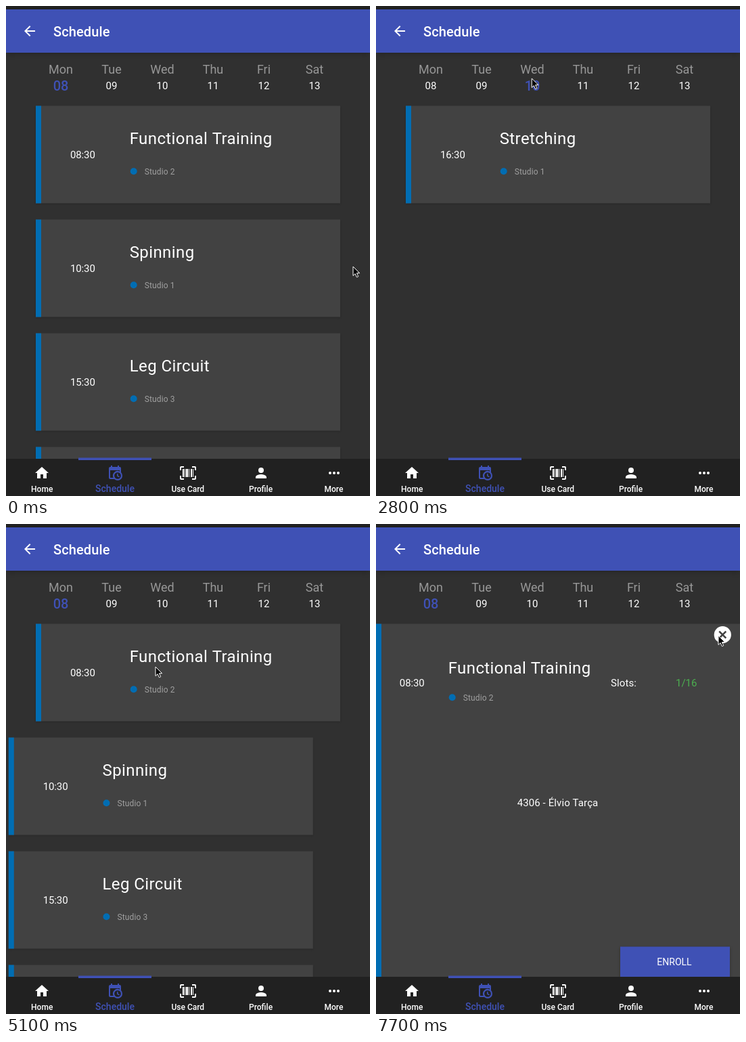
An HTML page with a canvas that plays this animation: 538x724 px, repeating every 8 s.

```html
<!DOCTYPE html>
<html lang="en">
<head>
<meta charset="utf-8">
<title>Class schedule</title>
<style>
  html, body { margin: 0; width: 100%; height: 100%; overflow: hidden; background: #303030; }
  canvas { display: block; }
</style>
</head>
<body>
<canvas id="stage" width="538" height="724"></canvas>
<script>
const ctx = document.getElementById('stage').getContext('2d');
const W = 538, H = 724, LOOP = 8000;
const PAGE_W = 540, CARD_X = 44, CARD_Y = 147.5, CARD_W = 450, CARD_H = 144, CARD_STEP = 168, NAV_Y = 669;
const INDIGO = '#3f51b5', BLUE = '#006db3', GREY = '#a0a0a0', WHITE = '#fff';

const DAYS = ['Mon', 'Tue', 'Wed', 'Thu', 'Fri', 'Sat'];
const PAGES = [
  [['08:30', 'Functional Training', 'Studio 2'], ['10:30', 'Spinning', 'Studio 1'],
   ['15:30', 'Leg Circuit', 'Studio 3'], ['17:30', 'Pilates', 'Studio 1']],
  [['08:30', 'ABS', 'Studio 2'], ['10:30', 'PunchDrill', 'PunchDrill'],
   ['14:30', 'Pilates', 'Studio 1'], ['17:30', 'Spinning', 'Studio 1']],
  [['16:30', 'Stretching', 'Studio 1']]
];

// Taps on days: [time, day index]
const TAPS = [[1150, 1], [2130, 2], [3488, 1], [4290, 0]];
const DETAIL_TIME = 7000;
// Pointer tip: [time, x, y]
const POINTER = [
  [0, 513, 385], [120, 513, 385], [500, 180, 201], [600, 166, 208], [720, 166, 208], [1000, 172, 115],
  [1450, 172, 115], [2000, 232, 107], [2720, 232, 107], [3500, 150, 106], [3780, 150, 106],
  [4200, 93, 118], [4290, 86, 114], [4450, 86, 114], [4900, 221, 211], [5350, 221, 211],
  [6000, 400, 268], [6980, 400, 268], [7700, 506, 165], [8000, 506, 165]
];

const ICONS = {
  back: new Path2D('M20 11H7.83l5.59-5.59L12 4l-8 8 8 8 1.41-1.41L7.83 13H20z'),
  home: new Path2D('M10 20v-6h4v6h5v-8h3L12 3 2 12h3v8z'),
  person: new Path2D('M12 12a4 4 0 1 0 0-8 4 4 0 0 0 0 8zm0 2c-2.67 0-8 1.34-8 4v2h16v-2c0-2.66-5.33-4-8-4z'),
  calendar: new Path2D('M15 13h1.5v2.82l2.44 1.41-.75 1.3L15 16.69zM19 8H5v11h4.67A7 7 0 0 1 19 9.67z' +
    'M5 21a2 2 0 0 1-2-2V5a2 2 0 0 1 2-2h1V1h2v2h8V1h2v2h1a2 2 0 0 1 2 2v6.1A7 7 0 0 1 11.1 21z' +
    'M16 11.15a4.85 4.85 0 1 0 0 9.7 4.85 4.85 0 0 0 0-9.7z'),
  corners: new Path2D('M1 8V4a1 1 0 0 1 1-1h4M18 3h4a1 1 0 0 1 1 1v4M23 16v4a1 1 0 0 1-1 1h-4M6 21H2a1 1 0 0 1-1-1v-4'),
  bars: new Path2D('M4 6h2v12H4zM7 6h1v12H7zM9 6h3v12H9zM13 6h1v12h-1zM16 6h2v12h-2zM19 6h1v12h-1z'),
  cross: new Path2D('M-5-5L5 5M5-5L-5 5'),
  pointer: new Path2D('M0 0V13.500L3.100 10.600 5.400 15.700 7.700 14.700 5.400 9.700H9.700Z')
};

const clamp = v => Math.min(1, Math.max(0, v));
const mix = (a, b, p) => a + (b - a) * p;

function bezier(x1, y1, x2, y2) {
  const at = (a, b, s) => 3 * (1 - s) * (1 - s) * s * a + 3 * (1 - s) * s * s * b + s * s * s;
  return x => {
    if (x <= 0 || x >= 1) return clamp(x);
    let lo = 0, hi = 1;
    for (let i = 0; i < 24; i++) {
      const mid = (lo + hi) / 2;
      if (at(x1, x2, mid) < x) lo = mid; else hi = mid;
    }
    return at(y1, y2, lo);
  };
}
const swipeEase = bezier(.15, .3, .25, 1);
const easeInOut = bezier(.42, 0, .58, 1);

function rect(x, y, w, h, color) {
  ctx.fillStyle = color;
  ctx.fillRect(x, y, w, h);
}

function shadowRect(x, y, w, h, color, blur, dy, alpha) {
  ctx.save();
  ctx.shadowColor = `rgba(0,0,0,${alpha})`;
  ctx.shadowBlur = blur;
  ctx.shadowOffsetY = dy;
  rect(x, y, w, h, color);
  ctx.restore();
}

function disc(x, y, r, color) {
  ctx.fillStyle = color;
  ctx.beginPath();
  ctx.arc(x, y, r, 0, 7);
  ctx.fill();
}

function text(str, x, y, size, color = WHITE, { align = 'left', weight = 400, spacing = 0 } = {}) {
  ctx.font = `${weight} ${size}px Roboto, sans-serif`;
  ctx.textAlign = align;
  ctx.letterSpacing = spacing + 'px';
  ctx.fillStyle = color;
  ctx.fillText(str, x, y);
}

function icon(path, x, y, color, lineWidth) {
  ctx.save();
  ctx.translate(x, y);
  ctx.fillStyle = ctx.strokeStyle = color;
  ctx.lineWidth = lineWidth || 1;
  if (lineWidth) ctx.stroke(path); else ctx.fill(path, 'evenodd');
  ctx.restore();
}

function label([time, title, room], timeX, titleX, timeY, titleY, roomY) {
  text(time, timeX, timeY, 15, WHITE, { spacing: -.1 });
  text(title, titleX, titleY, 24, WHITE, { spacing: .4 });
  disc(titleX + 6, roomY - 4.7, 5, BLUE);
  text(room, titleX + 22, roomY, 12, GREY, { spacing: .13 });
}

function card(item, x, y, grow = 0, detail = false) {
  const left = x - CARD_X * grow;
  const w = mix(CARD_W, W, grow), h = mix(CARD_H, NAV_Y - CARD_Y, grow);
  shadowRect(left, y, w, h, '#424242', 3, 1, .2);
  rect(left, y, 8, h, BLUE);
  if (detail) {
    label(item, 34.8, 106.7, 240, 221, 261);
    return;
  }
  const mid = y + h / 2;
  label(item, left + 50.9 + 15.5 * grow, left + 138.7 + 30 * grow, mid + 5.5, mid - 15.5, mid + 29.5);
}

function details() {
  text('Slots:', 347, 240, 15, WHITE, { spacing: .1 });
  text('1/16', 443, 240, 15, '#4caf50');
  text('4306 - Élvio Tarça', 268.5, 417, 15, WHITE, { align: 'center', spacing: .1 });
  shadowRect(361, 624.5, 162, 44.5, INDIGO, 4, 1, .3);
  text('ENROLL', 441, 652, 14, WHITE, { align: 'center' });
  disc(512.3, 163.7, 12.6, WHITE);
  icon(ICONS.cross, 512.3, 163.7, '#424242', 2.6);
}

function pages(t) {
  let position = 0;
  for (const [start, day] of TAPS)
    if (t >= start) position = mix(position, day, swipeEase((t - start) / 350));
  const leave = easeInOut((t - 4948) / 800);
  const grow = easeInOut((t - 5855) / 800);
  const detail = t >= DETAIL_TIME;
  PAGES.forEach((items, p) => {
    const offset = (p - position) * PAGE_W;
    if (Math.abs(offset) >= PAGE_W) return;
    items.forEach((item, i) => {
      const first = i === 0;
      card(item, CARD_X + offset - (first ? 0 : leave * PAGE_W), CARD_Y + i * CARD_STEP,
        first ? grow : 0, first && detail);
    });
  });
  if (detail) details();
}

function dayStrip(t) {
  const tap = TAPS.filter(([start]) => t >= start).pop();
  const active = tap ? tap[1] : 0;
  DAYS.forEach((name, i) => {
    const x = 81 + i * 75, number = String(8 + i).padStart(2, '0');
    text(name, x, 100, 18, '#979797', { align: 'center' });
    if (i === active) text(number, x, 125, 20, INDIGO, { align: 'center', weight: 500 });
    else text(number, x, 123, 15, WHITE, { align: 'center' });
  });
  if (tap) ripple(81 + active * 75, 117, (t - tap[0]) / 300);
}

function ripple(x, y, u) {
  if (u >= 1) return;
  const outer = 9 + 18 * (1 - (1 - u) ** 2);
  const width = Math.min(outer, 13 * (1 - u));
  disc(x, y, outer - width, `rgba(63,81,181,${.3 * (1 - u)})`);
  ctx.strokeStyle = INDIGO;
  ctx.lineWidth = width;
  ctx.beginPath();
  ctx.arc(x, y, outer - width / 2, 0, 7);
  ctx.stroke();
}

function header() {
  shadowRect(0, 5, W, 64, INDIGO, 8, 2, .25);
  rect(0, 0, W, 5, '#212121');
  icon(ICONS.back, 23, 25, WHITE);
  text('Schedule', 70, 45, 20, WHITE, { weight: 500, spacing: .12 });
}

function navigation() {
  rect(0, NAV_Y, W, H - NAV_Y, '#212121');
  rect(107, 667.5, 108, 3.5, INDIGO);
  ['Home', 'Schedule', 'Use Card', 'Profile', 'More'].forEach((name, i) => {
    const active = i === 1;
    text(name, 53.2 + i * 107.8, 718, active ? 14 : 12, active ? INDIGO : WHITE, { align: 'center', weight: 500 });
  });
  icon(ICONS.home, 41, 678, WHITE);
  icon(ICONS.calendar, 149, 678, INDIGO);
  icon(ICONS.corners, 257, 678, WHITE, 2);
  icon(ICONS.bars, 257, 678, WHITE);
  icon(ICONS.person, 365, 678, WHITE);
  for (const x of [479, 485, 491]) disc(x, 690, 2, WHITE);
}

function pointer(t) {
  const i = POINTER.findIndex(key => key[0] > t);
  const [t0, x0, y0] = POINTER[i - 1], [t1, x1, y1] = POINTER[i];
  const p = easeInOut((t - t0) / (t1 - t0));
  const x = mix(x0, x1, p), y = mix(y0, y1, p);
  icon(ICONS.pointer, x, y, '#000');
  icon(ICONS.pointer, x, y, WHITE, 1);
}

function draw(now) {
  const t = now % LOOP;
  rect(0, 0, W, H, '#303030');
  pages(t);
  header();
  dayStrip(t);
  navigation();
  pointer(t);
}

const began = performance.now();
function tick() {
  draw(performance.now() - began);
  requestAnimationFrame(tick);
}
tick();
</script>
</body>
</html>
```
